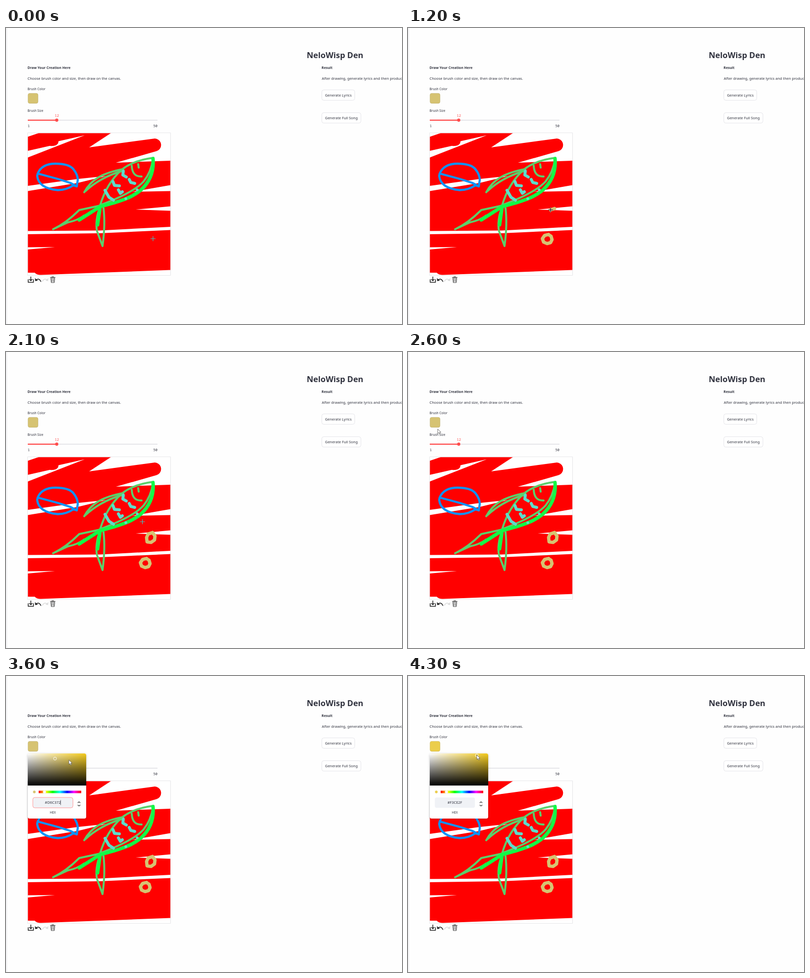
Recreate the animation shown at these times as an HTML page. Size 800x600 px, loop 4400 ms.

```html
<!DOCTYPE html>
<html lang="en">
<head>
<meta charset="utf-8">
<title>Drawing page</title>
<style>
  html, body { margin: 0; width: 100%; height: 100%; overflow: hidden; background: #fefefe; }
  svg { display: block; width: 800px; height: 600px; }
  text { font: 7.4px "Noto Sans", sans-serif; fill: #31333f; }
  .title { font-size: 16.4px; font-weight: 700; }
  .head { font-size: 7.03px; font-weight: 700; }
  .label { font-size: 6.5px; }
  .mono { font: 7.1px "Noto Sans Mono", monospace; }
  .mid { text-anchor: middle; }
  .button { fill: #fff; stroke: #dfdfe4; stroke-width: .8; }
  .ink { fill: none; stroke-linecap: round; stroke-linejoin: round; }
</style>
</head>
<body>
<svg viewBox="0 0 800 600">
  <defs>
    <linearGradient id="tint"><stop stop-color="#fff"/><stop offset="1" stop-color="#f3ca1c"/></linearGradient>
    <linearGradient id="shade" x2="0" y2="1"><stop stop-color="#000" stop-opacity="0"/><stop offset="1"/></linearGradient>
    <linearGradient id="hues">
      <stop stop-color="#f00"/><stop offset=".17" stop-color="#ff0"/><stop offset=".33" stop-color="#0f0"/>
      <stop offset=".5" stop-color="#0ff"/><stop offset=".67" stop-color="#00f"/>
      <stop offset=".83" stop-color="#f0f"/><stop offset="1" stop-color="#f00"/>
    </linearGradient>
    <filter id="shadow" x="-20%" y="-20%" width="140%" height="140%">
      <feDropShadow dx="0" dy="1" stdDeviation="2" flood-opacity=".22"/>
    </filter>
    <clipPath id="panel"><rect x="44" y="157" width="118" height="132" rx="4"/></clipPath>
  </defs>

  <path d="M1.5 0V600" stroke="#e6e6ea"/>

  <text class="title" x="607.5" y="61">NeloWisp Den</text>
  <text class="head" x="43.5" y="83">Draw Your Creation Here</text>
  <text x="43.6" y="104.6">Choose brush color and size, then draw on the canvas.</text>
  <text class="label" x="43.5" y="126">Brush Color</text>
  <text class="label" x="43.6" y="170.2">Brush Size</text>
  <text class="head" x="637.5" y="83">Result</text>
  <text x="638" y="104.6">After drawing, generate lyrics and then produce a full song.</text>

  <rect class="button" x="638" y="125.5" width="66.5" height="21" rx="4"/>
  <text class="mid" x="671.3" y="138.6">Generate Lyrics</text>
  <rect class="button" x="638" y="171.7" width="79" height="21" rx="4"/>
  <text class="mid" x="677.5" y="184.8">Generate Full Song</text>

  <rect id="swatch" x="44.3" y="132.3" width="20.6" height="20.6" rx="4" stroke="#000" stroke-opacity=".13" stroke-width=".7"/>

  <path d="M44 186.800H306" stroke="#e7e7eb" stroke-width="2.2"/>
  <path d="M44 186.800H102" stroke="#ff4b4b" stroke-width="2.2"/>
  <circle cx="102.5" cy="186.8" r="3.2" fill="#ff4b4b"/>
  <text class="mono mid" x="102.8" y="180.4" style="fill:#ff4b4b">12</text>
  <text class="mono" x="43.7" y="201.3">1</text>
  <text class="mono" x="297.5" y="201.3">50</text>

  <!-- painting -->
  <rect x="43.7" y="212.7" width="288.8" height="288.6" fill="#fff" stroke="#dedee2" stroke-width=".8"/>
  <path fill="#f00" d="M44.300 213.300H332V501H44.300Z"/>
  <g fill="#fff">
    <path d="M44 213H66L44 220.500Z"/>
    <path d="M44 249L88 239C101 240 106 236 106 229.500L159 217.500L44 262.500Z"/>
    <path d="M212 213L168 242L297 224.500A13 13 0 0 1 303.500 249.800L222 273L332 269V213Z"/>
    <path d="M44 320L145 306L202 300L145 314L44 330.500Z"/>
    <path d="M255 332L332 318.500V330.500Z"/>
    <path d="M262 368L332 361.500V370.500Z"/>
    <path d="M44 411.500L190 410.500L332 403V409.500L190 416L44 418Z"/>
    <path d="M44 444.500L99 444L44 449Z"/>
    <path d="M44 496H58Q62 500.500 70 500.500L332 490.500V501H44Z"/>
  </g>
  <path class="ink" stroke="#0c93fa" stroke-width="4.4" d="M64 295C70 281 83 275 100 275Q127 275 136 286Q145 297 145 308L143 321L136 319Q121 329 104 328.500Q66 325 63 300L64 295L105 306L130 314L143 321"/>
  <g class="ink" stroke="#5bcf6b" stroke-width="4">
    <path d="M298 263Q258 268 234 287Q203 315 190 360M190 359C225 346 262 329 278 311Q293 292 297 266"/>
    <path d="M158 333C172 307 194 294 237 286M160 331Q190 303 234 290"/>
    <path d="M95 408Q121 396 148 369L190 360M95 408L125 394Q145 390 158 380"/>
    <path d="M191 362C183 378 181 400 184 412L195 442Q201 398 197 365"/>
    <path d="M254 279Q255 302 274 301M267 276L268 283"/>
  </g>
  <g class="ink" stroke="#12fb46" stroke-width="7">
    <path d="M297 265C299 289 291 311 273 328C255 344 229 352 190 362L148 389M190 364L185 399"/>
  </g>
  <g class="ink" stroke="#5ddccb" stroke-width="6">
    <path d="M237 290L236 298L243 302M249 307L252 313L260 315M216 311L219 319L229 320M227 328L231 335L235 332M200 329L208 343L217 349"/>
    <path d="M265 328h.1M242 346h.1" stroke-width="5.500"/>
  </g>
  <g class="ink" stroke="#d6c372" stroke-width="6.7">
    <path id="ringA" pathLength="100" d="M284 418.500L276 420.500L271.500 427L274 434L281 437L288 435L291 429L289 422L285 419.500"/>
    <path id="ringB" pathLength="100" d="M296 366L287 369L284 376L285 385L293 386L300 381L301 373L296 366"/>
  </g>

  <!-- toolbar -->
  <g class="ink" stroke="#222" stroke-width="1.5">
    <path d="M44.800 510V515.500H55.500V510M50.200 504.500V512M47.300 509.500L50.200 512.300L53 509.500"/>
    <path d="M62 510Q67.500 507 70.500 514"/>
    <path d="M82 510Q76.500 507 73.500 514" stroke="#ddd"/>
    <path d="M90.500 507L91.500 516H97.500L98.500 507ZM89.500 505.500H99.500M92.500 504H96.500M93 508.500V514M96 508.500V514" stroke="#444" stroke-width="1.100"/>
  </g>
  <path d="M58.500 507L59 513L64.500 512Z" fill="#222"/>
  <path d="M85.500 507L85 513L79.500 512Z" fill="#ddd"/>

  <!-- color picker -->
  <g id="picker">
    <rect x="44" y="157" width="118" height="132" rx="4" fill="#fff" filter="url(#shadow)"/>
    <g clip-path="url(#panel)">
      <rect x="44" y="157" width="118" height="65" fill="url(#tint)"/>
      <rect x="44" y="157" width="118" height="65" fill="url(#shade)"/>
    </g>
    <circle id="handle" r="3" fill="none" stroke="#fff" stroke-width=".9"/>
    <circle id="dot" cx="57.2" cy="235" r="2.7"/>
    <rect x="66" y="232.500" width="86" height="5" fill="url(#hues)"/>
    <circle cx="77.7" cy="235" r="3" fill="#fff" stroke="#ddd" stroke-width=".4"/>
    <rect id="field" x="54.2" y="246.200" width="81" height="21" rx="4" fill="#f0f2f6" stroke-width=".9"/>
    <text id="hex" class="mid" x="94.5" y="259.200"></text>
    <path id="caret" d="M110.300 251.500V261.500" stroke="#31333f" stroke-width=".8"/>
    <text class="mid label" x="94.5" y="278.500">HEX</text>
    <path class="ink" d="M145.200 257L147.500 254.800L149.800 257M145.200 261.500L147.500 263.700L149.800 261.500" stroke="#333" stroke-width="1.100"/>
  </g>

  <path id="cross" d="M-5 0H5M0 -5V5" stroke="#ccc" stroke-width="1.100" style="mix-blend-mode:difference"/>
  <path id="arrow" d="M0 0V9.200L2.200 7.300L3.800 10.500L5.300 9.800L3.800 6.700H6.500Z" fill="#fff" stroke="#555" stroke-width=".8"/>
</svg>

<script>
const LOOP = 4400, STEP = 100;
const el = Object.fromEntries([...document.querySelectorAll("[id]")].map(e => [e.id, e]));

const strokes = [
  { path: el.ringA, from: 200, to: 800 },
  { path: el.ringB, from: 1100, to: 1800 }
];

// time, x, y
const travel = [
  [0, 297, 427], [200, 284, 418.5], [800, 285, 420.5], [1100, 296, 366],
  [2000, 296, 366], [2200, 255, 322], [2400, 120, 205], [2600, 60, 156],
  [2800, 54, 145], [3000, 57, 147], [3200, 177, 177], [3400, 143, 176],
  [3600, 127, 170], [4100, 139, 160], [4400, 139, 160]
];

const clamp = v => Math.max(0, Math.min(1, v));
const show = (node, on) => node.style.display = on ? "" : "none";
const place = (node, x, y) => node.setAttribute("transform", `translate(${x} ${y})`);

function pointerAt(t) {
  const active = strokes.find(s => t >= s.from && t <= s.to);
  if (active) {
    const { path, from, to } = active;
    const p = path.getPointAtLength(path.getTotalLength() * (t - from) / (to - from));
    return [p.x, p.y];
  }
  const i = travel.findIndex(k => k[0] > t);
  const [t0, x0, y0] = travel[i - 1], [t1, x1, y1] = travel[i];
  const k = (t - t0) / (t1 - t0);
  return [x0 + (x1 - x0) * k, y0 + (y1 - y0) * k];
}

function render(t) {
  for (const { path, from, to } of strokes) {
    const done = clamp((t - from) / (to - from));
    show(path, done > 0);
    path.setAttribute("stroke-dasharray", done < 1 ? `${done * 100} 200` : "none");
  }

  const [x, y] = pointerAt(t);
  const painting = x > 44 && x < 332 && y > 213;
  show(el.cross, painting);
  show(el.arrow, !painting);
  place(painting ? el.cross : el.arrow, x, y);

  const picked = t >= 4200;
  const color = picked ? "#ebcd4b" : "#d6c372";
  el.swatch.setAttribute("fill", color);
  el.dot.setAttribute("fill", color);
  el.hex.textContent = picked ? "#F3CE2F" : "#D6C372";
  el.field.setAttribute("stroke", picked ? "none" : "#ff8d8d");
  show(el.caret, !picked);
  place(el.handle, picked ? 139 : 99, picked ? 161 : 167.4);
  show(el.picker, t >= 3100);
  el.picker.style.opacity = t < 3200 ? .6 : t < 3300 ? .95 : 1;
}

const start = performance.now();
function tick() {
  const t = (performance.now() - start) % LOOP;
  render(Math.floor(t / STEP) * STEP);
  requestAnimationFrame(tick);
}
tick();
</script>
</body>
</html>
```
